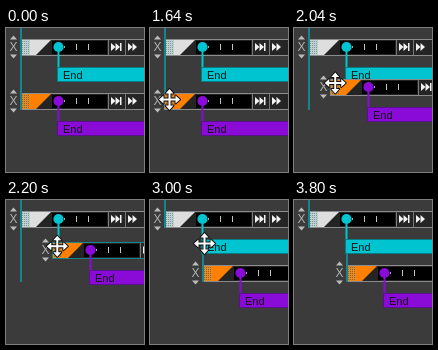
An HTML page with a canvas that plays this animation: 138 px wide and 144 px high, repeating every 4.98 s.

```html
<!DOCTYPE html>
<html lang="en">
<head>
<meta charset="utf-8">
<title>Nesting a track</title>
<style>
html, body { margin: 0; width: 100%; height: 100%; overflow: hidden; background: #3b3b3b; }
canvas { display: block; width: 138px; height: 144px; }
</style>
</head>
<body>
<canvas id="stage" width="138" height="144"></canvas>
<script>
const ctx = document.getElementById('stage').getContext('2d');
const LOOP = 4980, ROW = 54, INDENT = 38;
const HIDE_LABEL = 2170, DROP = 3000;
const LINE = '#17868c';
const TEAL = { fill: '#00c5d0', edge: '#067c84' };
const PURPLE = { fill: '#8a0bd8', edge: '#5a128a' };

const mix = (a, b, k) => a + (b - a) * k;
const span = (t, from, to) => Math.min(1, Math.max(0, (t - from) / (to - from)));
const smooth = k => k * k * (3 - 2 * k);
const easeOut = k => 1 - (1 - k) ** 2;

function rect(x, y, w, h, color) {
  ctx.fillStyle = color;
  ctx.fillRect(x, y, w, h);
}

function path(points) {
  ctx.beginPath();
  points.forEach(([x, y]) => ctx.lineTo(x, y));
  ctx.closePath();
}

function poly(points, color) {
  path(points);
  ctx.fillStyle = color;
  ctx.fill();
}

function at(x, y, paint) {
  ctx.save();
  ctx.translate(x, y);
  paint();
  ctx.restore();
}

function text(value, x, y, size, align, color) {
  ctx.font = size + 'px "Liberation Sans", Arial, sans-serif';
  ctx.textAlign = align;
  ctx.fillStyle = color;
  ctx.fillText(value, x, y);
}

function sideControls() {
  for (const dir of [-1, 1])
    poly([[4, 19 + 7.5 * dir], [7.5, 19 + 11.5 * dir], [11, 19 + 7.5 * dir]], '#bcbcbc');
  text('X', 7.5, 23, 12, 'center', '#b0b0b0');
}

function button(x, bar) {
  rect(x, 12, 16, 15, '#252525');
  rect(x, 12, 1, 15, '#777');
  for (const left of [x + 3, x + 7.5]) poly([[left, 15], [left + 4.5, 19], [left, 23]], '#f2f2f2');
  if (bar) rect(x + 12, 15, 1.5, 8, '#f2f2f2');
}

function track(strip, dots, wedge, edge) {
  sideControls();
  rect(14, 11, 160, 17, edge);
  rect(15, 12, 160, 15, '#242424');
  rect(15, 12, 9, 15, strip);
  for (let y = 13; y < 27; y += 2)
    for (let x = 16; x < 24; x += 2) rect(x, y, 1, 1, dots);
  poly([[24, 12], [45, 12], [30, 27], [24, 27]], wedge);
  rect(46, 13, 55, 13, '#000');
  rect(58, 18, 1, 2, '#aaa');
  for (const x of [70, 82]) rect(x, 16, 1, 6, '#c4c4c4');
  button(102, true);
  button(119, false);
}

function marker(color, stem) {
  rect(51.5, 19, 2, stem, color.fill);
  ctx.beginPath();
  ctx.arc(52.5, 19, 5.1, 0, 2 * Math.PI);
  ctx.fill();
}

function label(color) {
  rect(51, 39, 130, 15, color.edge);
  rect(52, 40, 130, 13, color.fill);
  text('End', 57, 51, 11, 'left', '#101010');
}

function outlined(points) {
  path(points);
  ctx.lineJoin = 'round';
  ctx.lineWidth = 2;
  ctx.strokeStyle = '#111';
  ctx.stroke();
  ctx.fillStyle = '#fff';
  ctx.fill();
}

function pointer() {
  outlined([[1, 1], [1, 16], [4.4, 13], [7, 19], [9.6, 18], [7, 12], [11.6, 12]]);
}

function moveCursor() {
  const shape = [];
  for (let i = 0, c = 1, s = 0; i < 4; i++, [c, s] = [-s, c])
    for (const [x, y] of [[-1, -1], [-1, -6], [-4, -6], [0, -10.5], [4, -6], [1, -6]])
      shape.push([x * c - y * s, x * s + y * c]);
  outlined(shape);
}

function cursor(t, pull) {
  if (t < 500 || t >= 3800) return;
  if (t < 900) {
    const k = easeOut(span(t, 480, 740));
    at(mix(138, 33, k), mix(104, 75, k), pointer);
  } else if (t < 1640) {
    const k = easeOut(span(t, 900, 1300));
    at(mix(33, 19.5, k), mix(75, 71.5, k), t < 1100 ? pointer : moveCursor);
  } else if (t < 3200) {
    at(19.5 + 35 * pull, 71.5 - 28 * pull ** 1.1, moveCursor);
  } else {
    // Swings out to the right, then down off the stage.
    const k = span(t, 3180, 3800) ** 1.6;
    at(mix(mix(55, 95, k), mix(95, 53, k), k), mix(mix(43, 85, k), mix(85, 142, k), k), pointer);
  }
}

function draw(t) {
  const nested = t >= DROP, preview = t >= HIDE_LABEL && !nested;
  const pull = smooth(span(t, 1640, 2330));
  const dx = nested ? INDENT : Math.round(35 * pull);
  const dy = nested ? 0 : Math.round(-26 * pull ** 1.3);

  rect(0, 0, 138, 144, '#3b3b3b');
  track('#c3d0d0', '#789a9d', '#dedede', '#8c8c8c');
  rect(14, 0, 2, nested ? 28 : 82, LINE);
  marker(TEAL, preview ? 25 : 20);
  if (!preview) label(TEAL);
  if (nested) rect(52, 54, 2, 28, LINE);

  at(dx, ROW + dy, () => {
    track('#e08a28', '#98622a', '#ff8000', preview ? LINE : '#8c8c8c');
    if (nested || !pull) rect(14, 11, 2, 17, LINE);
    marker(PURPLE, 20);
    label(PURPLE);
  });
  cursor(t, pull);
}

const start = performance.now();
function tick() {
  draw((performance.now() - start) % LOOP);
  requestAnimationFrame(tick);
}
tick();
</script>
</body>
</html>
```
